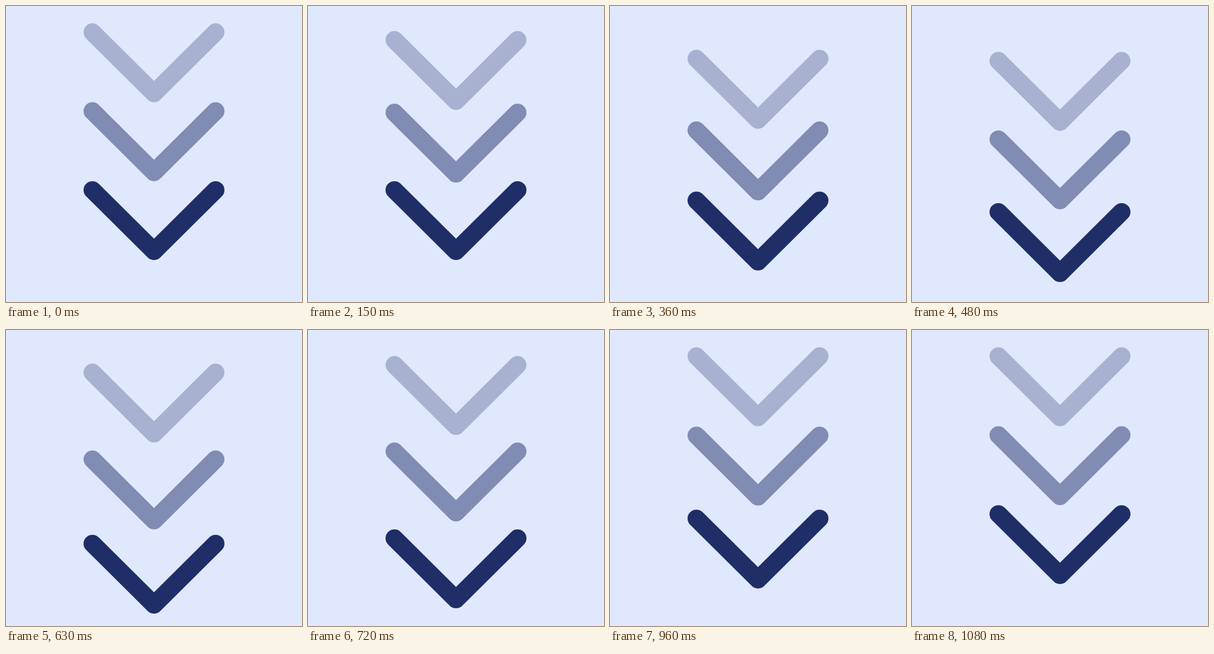
These frames come from a looping animation (500 by 500 pixels, 1200 ms). An HTML page with a canvas:

```html
<!DOCTYPE html>
<html lang="en">
<head>
<meta charset="utf-8">
<title>Scroll down chevrons</title>
<style>
  html, body { margin: 0; width: 100%; height: 100%; overflow: hidden; background: #dfe8fc; }
  canvas { display: block; width: 500px; height: 500px; }
</style>
</head>
<body>
<canvas id="stage" width="500" height="500"></canvas>
<script>
const ctx = document.getElementById('stage').getContext('2d');
const LOOP = 1200;
const STEP = 30;
const HALF = 450;     // time down, and time back up
const DELAY = 90;     // lag between neighbours
const TRAVEL = 50;
const SPACING = 133.3;
const COLORS = ['#a7b2d1', '#808cb3', '#1f2e66'];

// Bezier easing with handles (x1, 0) and (x2, 1)
function ease(x, x1, x2) {
  if (x <= 0) return 0;
  if (x >= 1) return 1;
  let lo = 0, hi = 1;
  for (let i = 0; i < 30; i++) {
    const s = (lo + hi) / 2, r = 1 - s;
    const at = 3 * r * r * s * x1 + 3 * r * s * s * x2 + s * s * s;
    if (at < x) lo = s; else hi = s;
  }
  return lo * lo * (3 - 2 * lo);
}

function offset(t) {
  const down = ease(t / HALF, 1 / 3, 2 / 3);
  const up = ease((t - HALF) / HALF, 1 / 6, 2 / 3);
  return TRAVEL * (down - up);
}

function chevron(y, color) {
  ctx.strokeStyle = color;
  ctx.beginPath();
  ctx.moveTo(146, y);
  ctx.lineTo(250, y + 103.3);
  ctx.lineTo(354, y);
  ctx.stroke();
}

function draw(ms) {
  const t = Math.floor((ms % LOOP) / STEP + 0.001) * STEP;
  ctx.fillStyle = '#dfe8fc';
  ctx.fillRect(0, 0, 500, 500);
  ctx.lineWidth = 30;
  ctx.lineCap = ctx.lineJoin = 'round';
  COLORS.forEach((color, i) => {
    chevron(44.3 + i * SPACING + offset(t - i * DELAY), color);
  });
}

const start = performance.now();
function tick(now) {
  draw(Math.max(0, now - start));
  requestAnimationFrame(tick);
}
draw(0);
requestAnimationFrame(tick);
</script>
</body>
</html>
```
